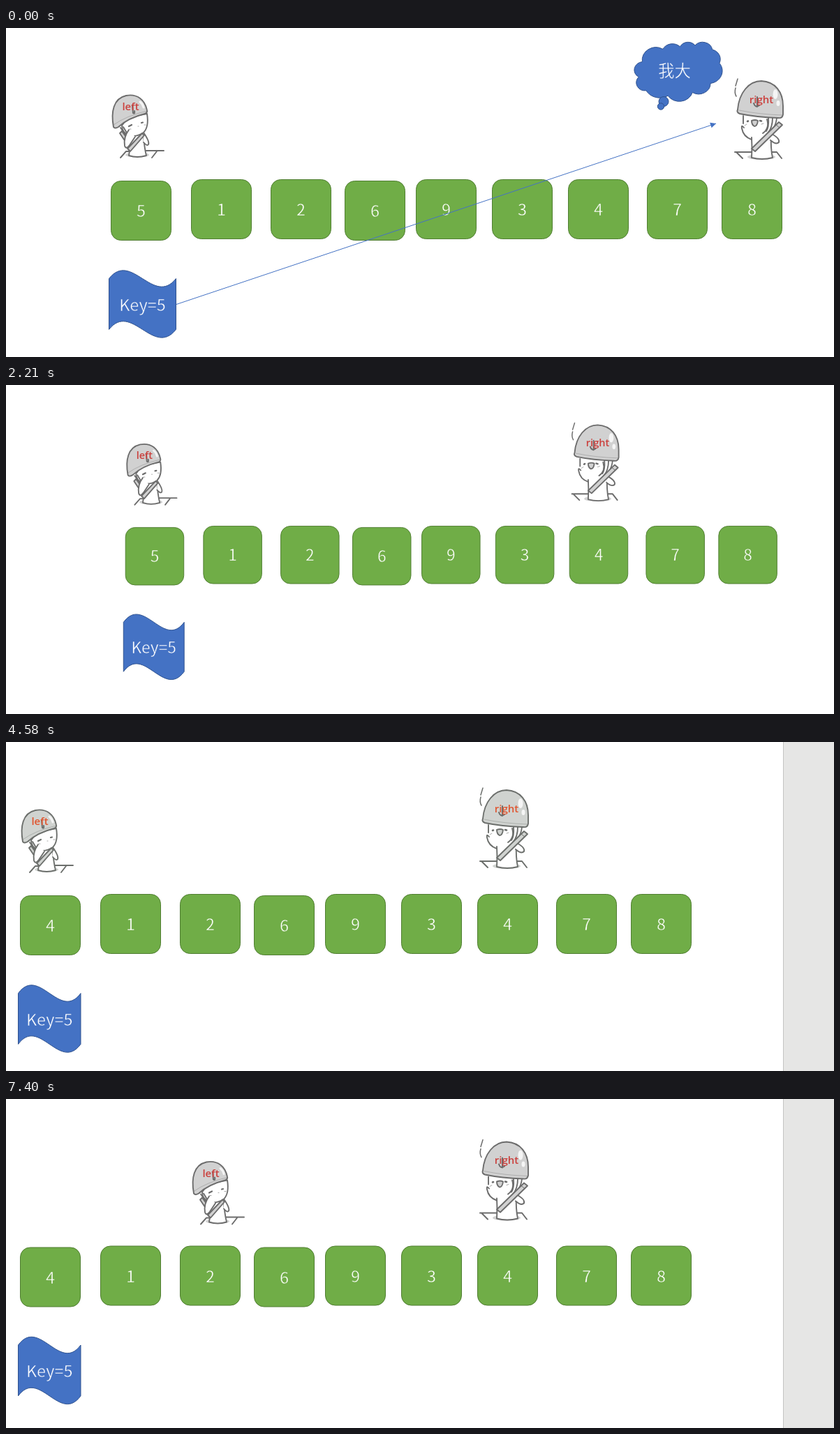
These frames come from a looping animation (1186x472 px, 8000 ms). An HTML page:

```html
<!DOCTYPE html>
<html lang="zh">
<head>
<meta charset="utf-8">
<title>Partition steps</title>
<style>
html, body { margin: 0; width: 100%; height: 100%; overflow: hidden; background: #fff; }
svg { display: block; width: 1186px; height: 472px; }
text { text-anchor: middle; }
/* A hairline in the background colour thins the white glyphs. */
.cjk { font: 300 23.5px "Noto Sans CJK SC", "Noto Sans CJK", "Noto Sans", sans-serif; fill: #fff; stroke: #4472c4; stroke-width: .45; }
.digit { stroke: #70ad47; }
.name { font: 600 15px "Open Sans", "Noto Sans", sans-serif; }
.blue { fill: #4472c4; stroke: #2f528f; }
</style>
</head>
<body>
<svg id="stage" viewBox="0 0 1186 472"></svg>
<script>
const LOOP = 8000;
const stage = document.getElementById('stage');
const COLUMNS = [20.5, 135.5, 249.5, 355.5, 457.5, 566.5, 675.5, 788.5, 895.5];
const DIGITS = [5, 1, 2, 6, 9, 3, 4, 7, 8];

const RED = { line: '#6c6c6c', fill: '#d1d1d1', label: '#cb403d' };
const GREEN = { line: '#4f7b66', fill: '#c3cfc5', label: '#438453' };
const ORANGE = { line: '#6c6f6c', fill: '#d0d3d0', label: '#e0552f' };

// Each step holds until the next one starts; positions are offsets in the board.
const wide = { dx: 130, keyWidth: 96, right: [109, 0] };
const docked = { panel: true };
const replaced = { ...docked, first: 4 };
const steps = [
  { at: 0, ...wide, dy: -1, right: [235, 8], bubble: [770, 21], arrow: [114, 397.5, 887, 138] },
  { at: 1190, ...wide, dy: 3 },
  { at: 1850, ...wide, dy: -1, bubble: [645, 40], arrow: [114, 397.5, 762, 138] },
  { at: 2210, dx: 151.3, dy: -9.7, scale: .971 },
  { at: 2870, ...docked, dy: 5, tone: GREEN, bubble: [105, 314], arrow: [12, 408, 668, 142] },
  { at: 3390, ...docked, tone: ORANGE },
  { at: 3920, ...replaced, tone: ORANGE },
  { at: 5740, ...replaced, dy: 5, bubble: [105, 314], arrow: [62, 398, 59, 193] },
  { at: 6400, ...replaced, left: [131, -1.5] },
  { at: 6880, ...replaced, dy: 5, left: [131, -1.5], bubble: [105, 314], arrow: [62, 398, 178, 192] },
  { at: 7400, ...replaced, dy: -7.5, left: [245, 0] }
];

const move = ([x, y], body) => `<g transform="translate(${x} ${y})">${body}</g>`;
const path = (d, attrs = '') => `<path d="${d}" ${attrs}/>`;
const text = (x, y, value, cls = 'cjk', attrs = '') =>
  `<text x="${x}" y="${y}" class="${cls}" ${attrs}>${value}</text>`;

function sketch(tone, body) {
  return `<g fill="none" stroke="${tone.line}" stroke-width="1.9" stroke-linecap="round" stroke-linejoin="round">${body}</g>`;
}

function leftSoldier(tone) {
  const fill = `fill="${tone.fill}"`;
  return sketch(tone,
    `<ellipse cx="58" cy="183" rx="17" ry="3.5" ${fill} stroke="none"/>` +
    path('M34 187L42 178H47M70 177H96M86 178L79 187') +
    path('M33 152L36 149L46 163L43 167Z', fill) +
    path('M49 158Q48 172 46 184Q58 188 71 184Q68 172 67 155', 'fill="#fff"') +
    path('M67 151Q76 164 74 168Q72 171 67 165', 'fill="#fff"') +
    path('M36 141Q36 151 46 155Q57 158 67 151Q75 143 72 124L45 129Z', 'fill="#fff"') +
    path('M34 144L41 154M38 143L44 153') +
    path('M46 147Q38 158 40 170Q42 176 47 169L55 157', 'fill="#fff"') +
    path('M44 174L65 152L68 155L48 178Z', fill) +
    path('M46 142L50 140M64 137L66 136.5', 'stroke-width="2.2"') +
    path('M47 146H49M68 140H70M59 142H60', 'stroke-width="1" opacity=".6"') +
    path('M24 143C20 121 24 102 42 98C58 95 69 104 72 119Q73 122 69 124Q45 130 31 143Q26 146 24 143Z', fill) +
    path('M24 140Q42 127 72 120', 'stroke-width="1" opacity=".35"') +
    path('M62 107Q66 110 67 115', 'stroke="#f4f4f4" stroke-width="3"') +
    path('M51 112L52 123Q55 125 54 120', 'stroke-width="2"')
  ) + text(48.5, 119, 'left', 'name', `fill="${tone.label}"`);
}

function rightSoldier(tone) {
  const fill = `fill="${tone.fill}"`;
  return sketch(tone,
    path('M683 66L680 76M680 79Q678 86 681 91', 'stroke-width="1.5"') +
    `<ellipse cx="717" cy="178" rx="20" ry="4" ${fill} stroke="none"/>` +
    path('M679 171H703M681 171L690 180M732 171H739L746 180', 'stroke-width="2"') +
    path('M703 150Q704 165 703 179Q718 183 733 179Q730 165 731 146', 'fill="#fff"') +
    path('M730 144Q744 151 742 157Q738 161 730 154', 'fill="#fff"') +
    path('M690 118Q688 137 702 146Q715 151 726 143Q733 136 733 120Z', 'fill="#fff" stroke="none"') +
    path('M691 119V130M725 124Q729 137 719 144') +
    path('M692 136Q688 131 689 137Q691 149 703 153', 'fill="#fff"') +
    path('M727 122Q728 135 724 141M733 122Q733 136 726 144M739 122Q738 132 733 138') +
    path('M742 128L747 132L708 170L703 166Z', fill) +
    path('M738 132L743 136', 'stroke-width="1"') +
    path('M697 127L698 126.5M715 126L717 126.5', 'stroke-width="2.6"') +
    path('M703 126Q708 124 712 126Q711 134 707 134Q703 132 703 126Z', fill) +
    path('M693 133L696 131M717 131L720 130', 'stroke-width="1" opacity=".6"') +
    path('M683 110C685 86 699 69 717 69C737 70 748 85 748 105V117Q747 123 741 122Q710 121 686 116Q681 114 683 110Z', fill) +
    path('M685 111Q714 117 747 118', 'stroke-width="1" opacity=".35"') +
    '<ellipse cx="737" cy="88" rx="3.5" ry="7" fill="#f5f5f5" stroke="none"/>' +
    '<ellipse cx="741" cy="101" rx="2.5" ry="4" fill="#f5f5f5" stroke="none"/>' +
    path('M711 92V106M706 101Q708 108 714 104', 'stroke-width="2"')
  ) + text(717, 100.5, 'right', 'name', `fill="${tone.label}"`);
}

// Cloud outline: elliptical arcs as [rx, ry, start, sweep], angles in degrees.
function cloudPath(width, height) {
  const arcs = [
    [6753, 9190, -190.49, 123.78], [5333, 7267, -144.1, 89.95], [4365, 5945, -145.81, 99.72],
    [4857, 6595, -130.99, 117.24], [5333, 7273, -78.71, 109.03], [6775, 9220, -46.27, 130.27],
    [5785, 7867, .63, 114.03], [6752, 9215, 22.45, 115.17], [7720, 10543, 66.24, 75.71],
    [4360, 5918, -274.94, 146.74], [4345, 5945, -246.83, 152.52]
  ];
  const sx = width / 43200, sy = height / 43200;
  let x = 3900, y = 14370, d = `M${x * sx} ${y * sy}`;
  for (const [rx, ry, start, sweep] of arcs) {
    const point = degrees => {
      const a = degrees * Math.PI / 180;
      const t = Math.atan2(rx * Math.sin(a), ry * Math.cos(a));
      return [rx * Math.cos(t), ry * Math.sin(t)];
    };
    const from = point(start), to = point(start + sweep);
    x += to[0] - from[0];
    y += to[1] - from[1];
    d += `A${rx * sx} ${ry * sy} 0 0 1 ${x * sx} ${y * sy}`;
  }
  return d + 'Z';
}
const CLOUD = cloudPath(126, 85);

function bubble(position) {
  return move(position, path(CLOUD, 'class="blue"') +
    '<circle cx="42" cy="85.5" r="7" class="blue"/>' +
    '<circle cx="38" cy="92.5" r="4.7" class="blue"/>' +
    text(57.5, 49.5, '我大'));
}

function arrow([x1, y1, x2, y2]) {
  const angle = Math.atan2(y2 - y1, x2 - x1) * 180 / Math.PI;
  return path(`M${x1} ${y1}L${x2} ${y2}`, 'stroke="#4472c4"') +
    `<path d="M0 0L-8 -4V4Z" fill="#4472c4" transform="translate(${x2} ${y2}) rotate(${angle})"/>`;
}

function keyFlag(width) {
  const x = 17.5, top = 360.5, bottom = 433.5, bend = 40.5, third = width / 3;
  const d = `M${x} ${top}c${third} ${-bend} ${2 * third} ${bend} ${width} 0V${bottom}` +
    `c${-third} ${bend} ${-2 * third} ${-bend} ${-width} 0Z`;
  return path(d, 'class="blue"') + text(x + width / 2, 406.5, 'Key=5');
}

function tiles(first) {
  return COLUMNS.map((x, i) => {
    const y = i === 0 || i === 3 ? 220.5 : 218.5;
    return `<rect x="${x}" y="${y}" width="86" height="85" rx="14" fill="#70ad47" stroke="#507e32"/>` +
      text(x + 43, y + 51.5, i ? DIGITS[i] : first, 'cjk digit');
  }).join('');
}

function draw(step) {
  const { dx = 0, dy = 0, scale = 1, first = 5, keyWidth = 89.5, left = [0, 0], right = [0, 0], tone = RED } = step;
  stage.innerHTML =
    (step.panel ? '<rect x="1113" width="73" height="472" fill="#e6e6e5"/><path d="M1113.5 0V472" stroke="#c3c3c3"/>' : '') +
    `<g transform="translate(${dx} ${dy}) scale(${scale})">` +
    move(left, leftSoldier(tone)) + move(right, rightSoldier(tone)) +
    // The pointer passes over the tiles but under the flag and the cloud.
    tiles(first) + (step.arrow ? arrow(step.arrow) : '') +
    keyFlag(keyWidth) + (step.bubble ? bubble(step.bubble) : '') + '</g>';
}

let shown;
function tick(now) {
  const time = now % LOOP;
  const step = steps.findLast(s => s.at <= time);
  if (step !== shown) draw(shown = step);
  requestAnimationFrame(tick);
}
draw(shown = steps[0]);
requestAnimationFrame(tick);
</script>
</body>
</html>
```
